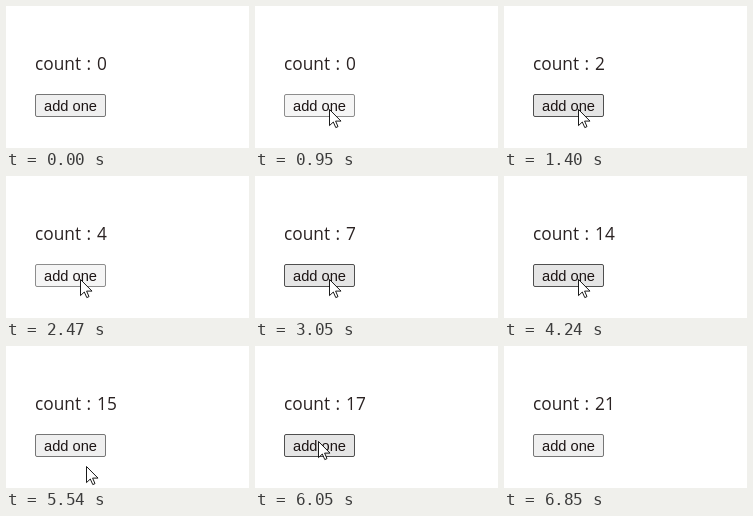
An HTML page for the animation above (7530 ms loop, 243 by 142 pixels).

```html
<!DOCTYPE html>
<html lang="en">
<head>
<meta charset="utf-8">
<title>Counter</title>
<style>
  html, body { margin: 0; width: 100%; height: 100%; overflow: hidden; background: #fff; }
  svg { display: block; width: 243px; height: 142px; }
  .count { font: 17.3px "Open Sans", "Noto Sans", sans-serif; fill: #2a2222; }
  .label { font: 14.667px "Liberation Sans", Arial, sans-serif; fill: #1c1414; }
</style>
</head>
<body>
<svg viewBox="0 0 243 142">
  <g class="count">
    <text x="29" y="64">count</text>
    <text x="80.5" y="64">:</text>
    <text id="value" x="91" y="64">0</text>
  </g>
  <rect id="button" x="29.5" y="88.5" width="70" height="22" rx="1.5"/>
  <text class="label" x="38" y="105">add one</text>
  <path id="cursor" d="M.5 .5V16.6L4.3 13L6.8 18.6L9 17.6L6.6 12.1H12Z" fill="#fff" stroke="#000" stroke-width=".9"/>
</svg>
<script>
const LOOP = 7530, STEP = 55, HOLD = 120;
const $ = id => document.getElementById(id);
const value = $("value"), button = $("button"), cursor = $("cursor");

// Runs of evenly spaced clicks; first is the time of the first release
const bursts = [
  { first: 1070, gap: 317, n: 4 },
  { first: 2590, gap: 170, n: 1 },
  { first: 2880, gap: 170, n: 10 },
  { first: 5880, gap: 170, n: 6 }
];
const releases = bursts.flatMap(b => Array.from({ length: b.n }, (_, i) => b.first + i * b.gap));

// The pointer glides in, rests on the button and glides out
const visits = [
  { enter: 330, settle: 550, leave: 4375, gone: 4650, from: [84, 135], at: [74, 103], to: [133, 142] },
  { enter: 5540, settle: 5705, leave: 6735, gone: 6850, from: [80, 120], at: [63, 95], to: [73, 115] }
];

const looks = {
  rest: ["#efefef", "#767676"],
  hover: ["#e5e5e5", "#4f4f4f"],
  active: ["#f5f5f5", "#8d8d8d"]
};

const clamp = k => Math.min(1, Math.max(0, k));

function progress(t, a, b) {
  const held = a + Math.floor((t - a) / STEP) * STEP;
  return clamp((held - a) / (b - a));
}

function pointer(t) {
  const v = visits.find(v => t >= v.enter && t < v.gone);
  if (!v) return null;
  const far = (1 - progress(t, v.enter, v.settle)) ** 1.7;
  const out = progress(t, v.leave, v.gone) ** 1.5;
  return v.at.map((p, i) => Math.round(p + (v.from[i] - p) * far + (v.to[i] - p) * out));
}

function draw(t) {
  const tip = pointer(t);
  const over = tip && tip[0] >= 29 && tip[0] < 100 && tip[1] >= 88 && tip[1] < 111;
  const down = releases.some(r => t >= r - HOLD && t < r);
  const [fill, stroke] = looks[!over ? "rest" : down ? "active" : "hover"];

  value.textContent = releases.filter(r => r <= t).length;
  button.setAttribute("fill", fill);
  button.setAttribute("stroke", stroke);
  cursor.setAttribute("visibility", tip ? "visible" : "hidden");
  if (tip) cursor.setAttribute("transform", `translate(${tip})`);
}

const start = performance.now();
function tick() {
  draw((performance.now() - start) % LOOP);
  requestAnimationFrame(tick);
}
tick();
</script>
</body>
</html>
```
